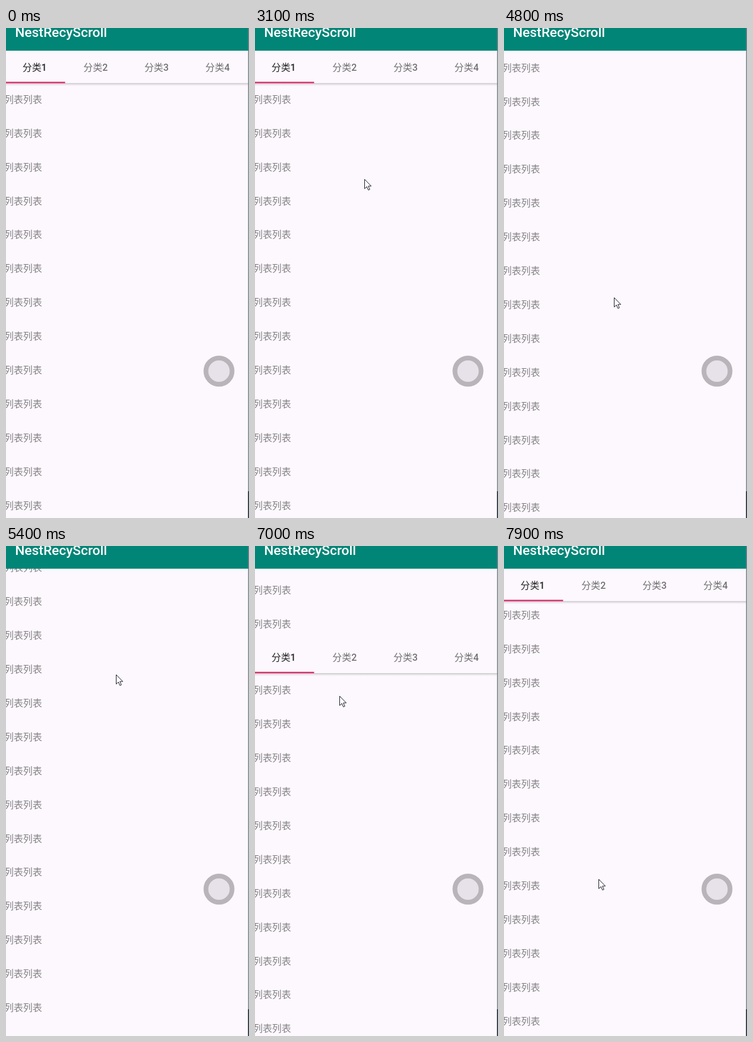
An HTML page that plays this animation: 409x824 px, repeating every 8 s.

```html
<!DOCTYPE html>
<html lang="zh-CN">
<head>
<meta charset="utf-8">
<title>NestRecyScroll</title>
<style>
  html, body { margin: 0; width: 100%; height: 100%; overflow: hidden; background: #fcf8fd; }
  svg { display: block; width: 100vw; height: 100vh; }
  text { font-family: Roboto, "Noto Sans CJK SC", "Noto Sans CJK", sans-serif; font-size: 15.93px; }
  .row { fill: #858286; }
  .tab { fill: #737074; font-weight: 500; text-anchor: middle; }
  .tab.on { fill: #262327; }
  .title { fill: #fff; font-size: 22.76px; font-weight: 500; }
</style>
</head>
<body>
<svg viewBox="0 0 409 824" preserveAspectRatio="none">
  <defs>
    <linearGradient id="shade" x1="0" y1="0" x2="0" y2="1">
      <stop offset="0" stop-color="#000" stop-opacity=".24"/>
      <stop offset=".4" stop-color="#000" stop-opacity=".08"/>
      <stop offset="1" stop-color="#000" stop-opacity="0"/>
    </linearGradient>
  </defs>
  <rect width="409" height="824" fill="#fcf8fd"/>
  <g id="rows"></g>
  <g id="tabs">
    <rect y="38.2" width="408" height="54.6" fill="#fcf8fd"/>
    <rect y="92.8" width="408" height="5" fill="url(#shade)"/>
    <rect y="90.5" width="99.5" height="2.3" fill="#dc2566"/>
  </g>
  <rect width="408" height="38.2" fill="#008577"/>
  <text class="title" x="15.2" y="14.8">NestRecyScroll</text>
  <circle cx="358.5" cy="577" r="18" fill="#e4dfe5" fill-opacity=".85"/>
  <circle cx="358.5" cy="577" r="22" fill="none" stroke="#0a050a" stroke-opacity=".28" stroke-width="8"/>
  <rect x="407.5" width="1.5" height="824" fill="#77828a"/>
  <rect x="407.5" y="779" width="1.5" height="45" fill="#1b2736"/>
  <path id="cursor" d="M.5 .5V16.2L4.2 12.8L6.8 18.6L9.2 17.5L6.7 11.9H11.6Z"
        fill="#fff" stroke="#1c1a26" stroke-width="1" stroke-linejoin="round"/>
</svg>
<script>
const NS = "http://www.w3.org/2000/svg";
const LOOP = 8000, STEP = 100;
const HEIGHT = 824, BAR = 38.2, TAB_BAR = 54.6, TAB_GAP = 102.6;
const PITCH = 56.9, HEADER_ROWS = 20, LIST_ROWS = 16;
const REST = -1.4;
const $ = id => document.getElementById(id);
const clamp = x => Math.min(1, Math.max(0, x));

// A swipe picks up speed under the finger, then the fling dies away
const fling = x => 1 - (1 - x ** 3) ** 5;
const smooth = x => x * x * (3 - 2 * x);

const swipes = [
  { at: 3200, time: 700, by: 511 },
  { at: 3750, time: 900, by: 628.4 },
  { at: 4900, time: 1200, by: -823.9 },
  { at: 6400, time: 1085, by: -319.5 }
];

// Pointer stops: [ms, x, y]
const stops = [
  [100, 85, 363], [700, 182, 431], [1800, 190, 447], [2200, 170, 314],
  [2500, 170, 314], [3100, 184, 254], [3500, 180, 440], [3900, 180, 306],
  [4200, 190, 540], [4800, 185, 453], [5300, 185, 216], [5900, 185, 216],
  [6200, 143, 430], [6800, 161, 128], [7000, 142, 252], [7900, 159, 560]
];

// Positive moves the tab bar down, negative scrolls the list under it
function scrollAt(t) {
  return swipes.reduce((sum, s) => sum + s.by * fling(clamp((t - s.at) / s.time)), REST);
}

function pointerAt(t) {
  const next = Math.max(1, stops.findIndex(s => s[0] >= t));
  const [t0, x0, y0] = stops[next - 1];
  const [t1, x1, y1] = stops[next];
  const k = smooth(clamp((t - t0) / (t1 - t0)));
  return [x0 + (x1 - x0) * k, y0 + (y1 - y0) * k].map(Math.round);
}

function addText(parent, cls, x, y, content) {
  const el = document.createElementNS(NS, "text");
  el.setAttribute("class", cls);
  el.setAttribute("x", x);
  el.setAttribute("y", y);
  el.textContent = content;
  return parent.appendChild(el);
}

for (let i = 0; i < 4; i++) {
  addText($("tabs"), i ? "tab" : "tab on", 48.2 + i * TAB_GAP, 71.5, "分类" + (i + 1));
}
const rows = Array.from({ length: HEADER_ROWS + LIST_ROWS },
  () => addText($("rows"), "row", -3, 0, "列表列表"));

function draw(t) {
  const scroll = scrollAt(t);
  const tabY = Math.max(0, scroll);
  rows.forEach((row, i) => {
    const n = i - HEADER_ROWS;
    const top = n < 0 ? BAR + tabY : BAR + TAB_BAR + scroll;
    const y = top + (n + 0.5) * PITCH;
    row.setAttribute("y", y + 6);
    row.setAttribute("visibility", y > 0 && y < HEIGHT + 20 ? "visible" : "hidden");
  });
  $("tabs").setAttribute("transform", `translate(0 ${tabY})`);

  const hidden = t < 100 || (t >= 2400 && t < 2600);
  $("cursor").setAttribute("transform", `translate(${pointerAt(t)})`);
  $("cursor").setAttribute("visibility", hidden ? "hidden" : "visible");
}

const start = performance.now();
function tick() {
  const t = (performance.now() - start) % LOOP;
  draw(Math.floor(t / STEP) * STEP);
  requestAnimationFrame(tick);
}
draw(0);
requestAnimationFrame(tick);
</script>
</body>
</html>
```
